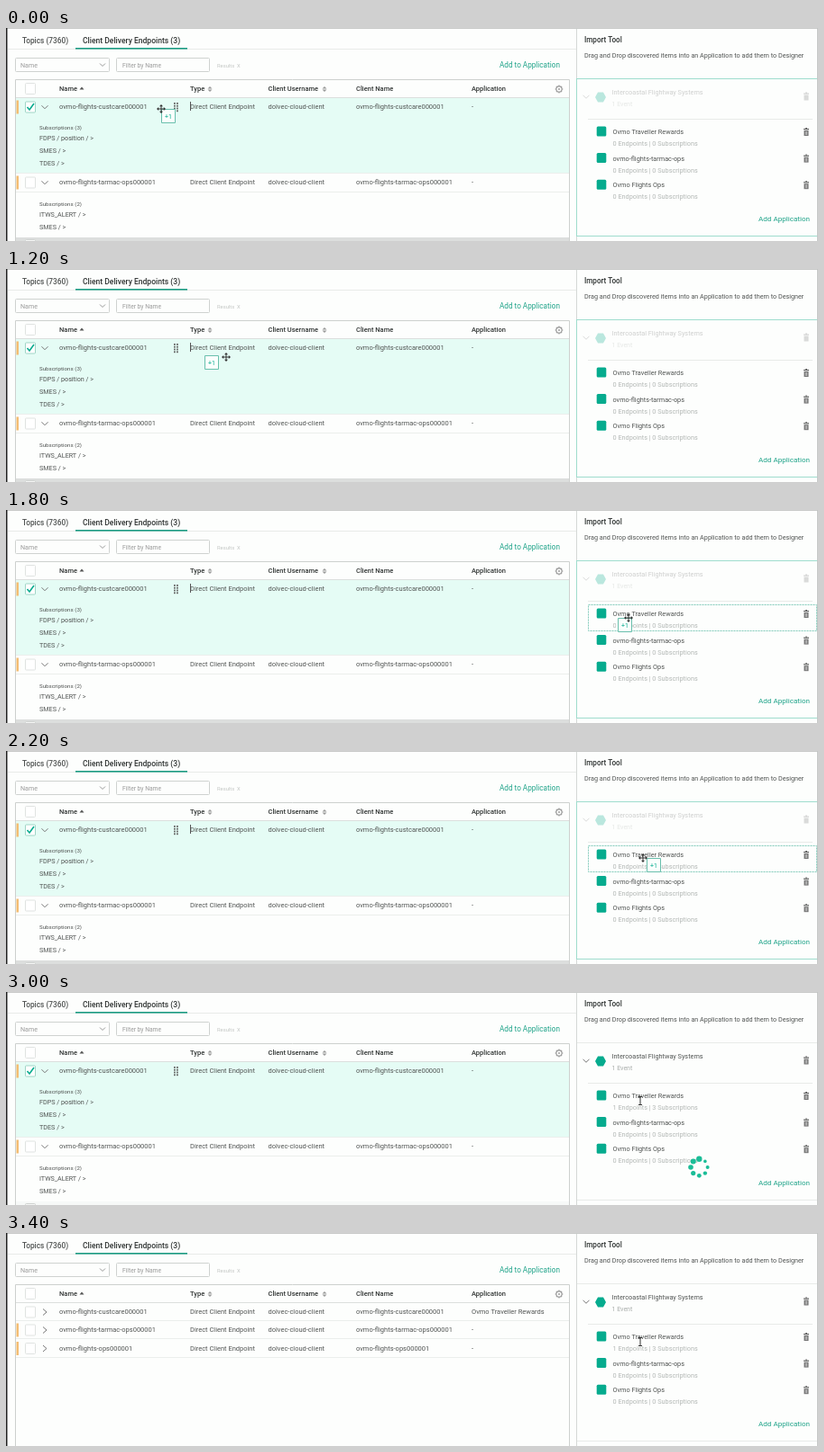
Write an HTML page with a canvas that moves like this. It is 900 px wide and 237 px high and loops after 3.6 s.

```html
<!DOCTYPE html>
<html>
<head>
<meta charset="utf-8">
<style>
html, body { margin: 0; width: 900px; height: 237px; overflow: hidden; background: #fdfefd; }
canvas { display: block; }
</style>
</head>
<body>
<canvas id="stage" width="900" height="237"></canvas>
<script>
const ctx = document.getElementById('stage').getContext('2d');
const TEAL = '#06ab8e', LINK = '#1fa389', INK = '#505352', DARK = '#303433', GRAY = '#a9adab', LINE = '#ebeeec';
const LOOP = 3600, DROP = 3000, DONE = 3400, HOVER = 1800;
const FLIGHT = 'ovmo-flights-';
const REWARDS = 'Ovmo Traveller Rewards';

// start time, pointer x and y, badge x and y
const DRAG = [
  [0, 172, 90, 172, 90],
  [1200, 244, 98, 220, 96],
  [1400, 452, 92, 432, 89],
  [1600, 624, 124, 613, 122],
  [1800, 690, 120, 678, 120],
  [2000, 733, 121, 737, 121],
  [2200, 706, 119, 710, 119],
  [2400, 702, 118, 703, 118.5]
];

function text(s, x, y, size = 7.5, color = INK, weight = 400) {
  ctx.font = `${weight} ${size}px Roboto, sans-serif`;
  ctx.fillStyle = color;
  ctx.fillText(s, x, y + 2.7);
}

function rect(x, y, w, h, color) {
  ctx.fillStyle = color;
  ctx.fillRect(x, y, w, h);
}

function box(x, y, w, h, stroke, fill, r = 1) {
  ctx.beginPath();
  ctx.roundRect(x + .5, y + .5, w - 1, h - 1, r);
  if (fill) { ctx.fillStyle = fill; ctx.fill(); }
  ctx.strokeStyle = stroke;
  ctx.lineWidth = 1;
  ctx.stroke();
}

function path(points, color, width = 1) {
  ctx.beginPath();
  points.forEach(([x, y]) => ctx.lineTo(x, y));
  ctx.strokeStyle = color;
  ctx.lineWidth = width;
  ctx.stroke();
}

function shape(points, color) {
  ctx.beginPath();
  points.forEach(([x, y]) => ctx.lineTo(x, y));
  ctx.fillStyle = color;
  ctx.fill();
}

function dot(x, y, r, color) {
  ctx.beginPath();
  ctx.arc(x, y, r, 0, 7);
  ctx.fillStyle = color;
  ctx.fill();
}

const chevronDown = (x, y, c = '#777', s = 3.5) => path([[x - s, y - s / 2], [x, y + s / 2], [x + s, y - s / 2]], c);
const chevronRight = (x, y) => path([[x - 2, y - 3.5], [x + 2, y], [x - 2, y + 3.5]], '#777');

function sortMark(x, y) {
  shape([[x - 2.5, y - .5], [x, y - 3], [x + 2.5, y - .5]], '#999');
  shape([[x - 2.5, y + .5], [x, y + 3], [x + 2.5, y + .5]], '#999');
}

function trash(x, y) {
  rect(x - 3, y - 4, 6, 1.2, '#666');
  rect(x - 1, y - 5, 2, 1, '#666');
  rect(x - 2.5, y - 2, 5, 6, '#777');
  rect(x - 1, y - 1, .6, 4, '#ddd');
  rect(x + .5, y - 1, .6, 4, '#ddd');
}

function gear(x, y) {
  for (let i = 0; i < 8; i++) {
    const c = Math.cos(i * Math.PI / 4), s = Math.sin(i * Math.PI / 4);
    path([[x + 3 * c, y + 3 * s], [x + 4.4 * c, y + 4.4 * s]], '#999', 1.1);
  }
  ctx.beginPath();
  ctx.arc(x, y, 3.1, 0, 7);
  ctx.stroke();
  dot(x, y, 1, '#999');
}

const checkbox = (y, checked) => box(21, y, 12, 13, checked ? '#9fd5c6' : '#e0e3e1', '#fff');

function row(y, name, { checked, open, app = '-', marked = true }) {
  if (marked) rect(11.5, y - 7, 2.5, 15, '#f3bd72');
  checkbox(y - 6, checked);
  if (checked) path([[23.5, y + .5], [26, y + 3.5], [31, y - 3.5]], TEAL, 1.6);
  (open ? chevronDown : chevronRight)(43, y + .5);
  text(FLIGHT + name, 59, y);
  text('Direct Client Endpoint', 204, y);
  text('dolvec-cloud-client', 290.5, y);
  text(FLIGHT + name, 388, y);
  text(app, 516, y);
}

function subscriptions(y, count, topics) {
  text(`Subscriptions (${count})`, 37, y, 6.2);
  topics.forEach((s, i) => text(s, 37, y + 12.5 + i * 14, 7.2));
}

function header() {
  rect(2, 23, 630, 1, '#e8ebe9');
  text('Topics (7360)', 18, 14, 8.3, INK, 500);
  text('Client Delivery Endpoints (3)', 85, 14, 8.55, DARK, 500);
  rect(77, 22, 124, 1.6, '#1c9c84');
  box(10, 33, 105, 16, '#cfd2d0');
  text('Name', 16, 41.5, 7.1, '#999');
  chevronDown(107, 41, '#999', 3);
  box(122, 33, 104, 16, '#cfd2d0');
  text('Filter by Name', 129, 41.5, 6.7, '#999');
  text('Results  X', 234, 41, 5.8, '#c3c6c4');
  text('Add to Application', 547, 41, 8.18, LINK);

  box(10, 57, 615, 200, '#cdd0ce', null, 0);
  checkbox(61);
  [['Name', 59], ['Type', 204], ['Client Username', 290.5], ['Client Name', 388], ['Application', 516]]
    .forEach(([s, x]) => text(s, x, 67.5, 7.5, DARK, 500));
  shape([[81.5, 68.5], [84, 65.5], [86.5, 68.5]], '#555');
  sortMark(226, 68);
  sortMark(353, 68);
  gear(613, 68);
  rect(11, 77, 613, 1, '#dcdfdd');
}

function openRows(t) {
  const dragging = t < DROP;
  rect(11, 78, 613, 83, '#e5fcf5');
  row(87.5, 'custcare000001', { checked: true, open: true });
  for (let i = 0; i < 8; i++) rect(186 + i % 2 * 3, 83 + (i >> 1) * 2.8, 1.8, 1.8, '#666');
  if (dragging) rect(204, 82, 1, 10, '#555');
  subscriptions(110, 3, ['FDPS / position / >', 'SMES / >', 'TDES / >']);
  rect(11, 161, 613, 1, LINE);
  row(171.5, 'tarmac-ops000001', { open: true });
  rect(11, 182, 613, 1, LINE);
  subscriptions(195, 2, ['ITWS_ALERT / >', 'SMES / >']);
  rect(11, 233, 613, 4, dragging ? '#dcdedd' : '#f7f9f8');
  box(21, 235, 12, 13, '#cfd2d0', '#f4f5f4');
}

function closedRows() {
  row(87.5, 'custcare000001', { app: REWARDS, marked: false });
  row(107.5, 'tarmac-ops000001', {});
  row(128, 'ops000001', {});
  [97, 117, 138].forEach(y => rect(11, y, 613, 1, LINE));
}

function panel(t) {
  const dragging = t < DROP;
  const edge = dragging ? '#9edccd' : '#e8ebe9';
  rect(632, 0, 1, 237, '#d5d8d6');
  text('Import Tool', 641, 13.5, 8.15, DARK, 500);
  text('Drag and Drop discovered items into an Application to add them to Designer', 641, 30.5, 7.24);
  rect(633, 56, 266, 1, edge);
  rect(633, 231, 266, 1, edge);
  if (dragging) rect(632, 56, 1, 176, edge);

  ctx.globalAlpha = dragging ? .27 : 1;
  chevronDown(643, 76.5);
  shape([[653, 77], [656, 71.5], [662, 71.5], [665, 77], [662, 82.5], [656, 82.5]], TEAL);
  text('Intercoastal Flightway Systems', 671.5, 71.5, 7.3);
  text('1 Event', 671.5, 84, 7, GRAY);
  trash(887, 76.5);
  ctx.globalAlpha = 1;
  rect(645, 101, 249, 1, '#e8ebe9');

  [REWARDS, FLIGHT + 'tarmac-ops', 'Ovmo Flights Ops'].forEach((name, i) => {
    const y = 115.5 + i * 29.6;
    const counts = !dragging && i === 0 ? [1, 3] : [0, 0];
    ctx.beginPath();
    ctx.roundRect(654.7, y - 6, 10.6, 11, 1.5);
    ctx.fillStyle = TEAL;
    ctx.fill();
    text(name, 672.5, y, 7.3);
    text(`${counts[0]} Endpoints | ${counts[1]} Subscriptions`, 672.5, y + 13, 7.3, '#b3b7b5');
    trash(887, y + .5);
  });
  text('Add Application', 834, 212, 8.1, LINK);

  if (dragging && t >= HOVER) {
    ctx.setLineDash([2, 1]);
    box(645, 105, 254, 30, '#83cbbb', null, 0);
    ctx.setLineDash([]);
  }
}

function moveCursor(x, y) {
  path([[x - 4, y], [x + 4, y]], '#333');
  path([[x, y - 4], [x, y + 4]], '#333');
  for (const [u, v] of [[1, 0], [-1, 0], [0, 1], [0, -1]])
    shape([[x + u * 5, y + v * 5], [x + u * 2.8 + v * 2, y + v * 2.8 + u * 2],
      [x + u * 2.8 - v * 2, y + v * 2.8 - u * 2]], '#333');
}

function pointer(t) {
  if (t >= DROP) {
    path([[703, 117], [703, 125]], '#333');
    path([[701, 116.5], [705, 116.5]], '#333');
    path([[701, 125.5], [705, 125.5]], '#333');
    return;
  }
  const [, x, y, bx, by] = DRAG.findLast(k => k[0] <= t);
  box(bx, by, 16, 16, '#69bfac', '#fbfffd', 0);
  text('+1', bx + 4, by + 8, 7, TEAL);
  moveCursor(x, y);
}

function spinner(t) {
  const head = t < 3200 ? 0 : 3;
  for (let i = 0; i < 8; i++) {
    const a = (head - i) * Math.PI / 4 - Math.PI / 2;
    dot(768.3 + 9.3 * Math.cos(a), 195 + 9.3 * Math.sin(a), 3.2 - i * .2, '#1bbd97');
  }
}

function frame(now) {
  const t = now % LOOP;
  rect(0, 0, 900, 237, '#fdfefd');
  header();
  if (t < DONE) openRows(t); else closedRows();
  panel(t);
  if (t >= DROP && t < DONE) spinner(t);
  pointer(t);
  rect(0, 0, 900, 1, '#c9cbca');
  rect(0, 0, 1.5, 237, '#222');
  rect(899, 0, 1, 237, '#c4c6c5');
  requestAnimationFrame(frame);
}
requestAnimationFrame(frame);
</script>
</body>
</html>
```
